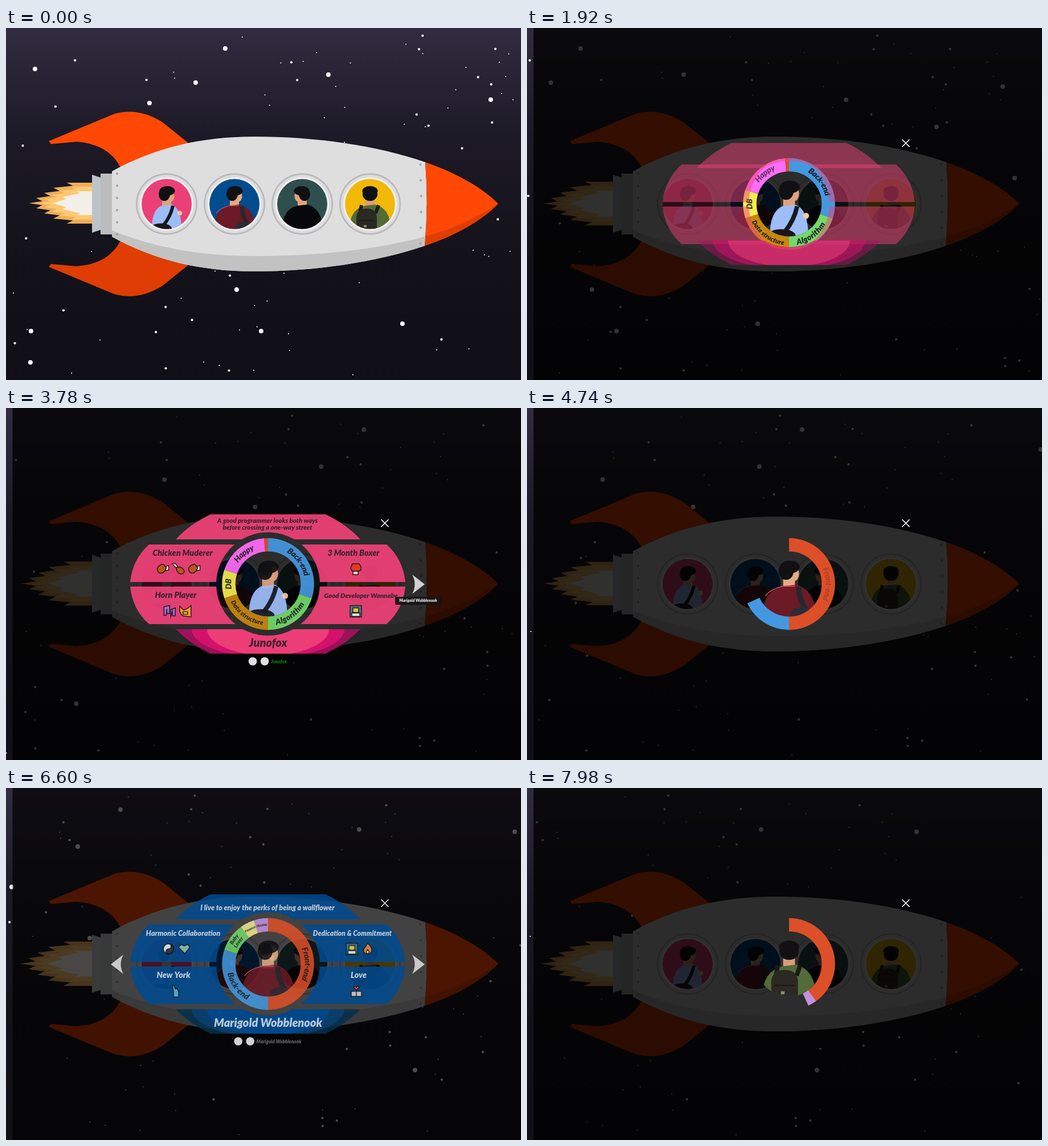
An HTML page with a canvas for the animation above (8 s loop, 904 by 619 pixels).

```html
<!DOCTYPE html>
<html lang="en">
<head>
<meta charset="utf-8">
<title>Rocket crew</title>
<style>
  html, body { margin: 0; width: 100%; height: 100%; overflow: hidden; background: #13121a; }
  canvas { display: block; }
</style>
</head>
<body>
<canvas id="stage" width="904" height="619"></canvas>
<script>
const ctx = document.getElementById('stage').getContext('2d');
const LOOP = 8000, TAU = Math.PI * 2, CX = 460, CY = 309.5;
const clamp = v => Math.max(0, Math.min(1, v));

function fill(color, path) {
  ctx.fillStyle = color;
  ctx.fill(typeof path === 'string' ? new Path2D(path) : path);
}
function line(color, width, path) {
  ctx.strokeStyle = color;
  ctx.lineWidth = width;
  ctx.stroke(new Path2D(path));
}
function oval(x, y, rx, ry, color) {
  ctx.beginPath();
  ctx.ellipse(x, y, rx, ry, 0, 0, TAU);
  ctx.fillStyle = color;
  ctx.fill();
}
const disc = (x, y, r, color) => oval(x, y, r, r, color);

function scoped(draw, alpha = 1) {
  if (alpha <= 0) return;
  ctx.save();
  ctx.globalAlpha *= alpha;
  draw();
  ctx.restore();
}
function mirrored(draw, width, height) {
  scoped(() => {
    ctx.translate(width, height);
    ctx.scale(width ? -1 : 1, height ? -1 : 1);
    draw();
  });
}
function setFont(size) {
  ctx.font = `italic 900 ${size}px Lato, sans-serif`;
}
function text(str, x, y, size, color) {
  setFont(size);
  ctx.textAlign = 'center';
  ctx.textBaseline = 'middle';
  ctx.fillStyle = color;
  ctx.fillText(str, x, y);
}

// Sky: the nearest stars have fixed places, the fine ones are scattered.
const nearStars = [[51, 72], [385, 36], [333, 96], [252, 132], [566, 82], [851, 126], [405, 460], [44, 533], [43, 588],
  [448, 533], [696, 520], [1126, 103], [1010, 174], [1147, 264], [1201, 38], [1620, 73], [1718, 496], [1893, 77]];

function scatter(count, width, seed) {
  const random = () => (seed = seed * 16807 % 2147483647) / 2147483647;
  return Array.from({ length: count }, () => [random() * width, random() * 619]);
}
const starLayers = [
  { speed: 30.3, r: 1, stars: scatter(75, 1150, 4127) },
  { speed: 60.6, r: 2.1, stars: scatter(52, 1390, 9281) },
  { speed: 151.5, r: 4, stars: nearStars }
];

const sky = ctx.createLinearGradient(0, 0, 0, 619);
[[0, '#312c40'], [.3, '#1d1a27'], [.65, '#13121a'], [1, '#100f17']].forEach(s => sky.addColorStop(...s));

function drawSky(t) {
  ctx.fillStyle = sky;
  ctx.fillRect(0, 0, 904, 619);
  for (const { speed, r, stars } of starLayers)
    for (const [x, y] of stars) disc(x - speed * t / 1000, y, r, '#fff');
}

// Crew seen from behind; facing is -1 left, 0 away, 1 right.
const crew = [
  { facing: 1, width: 26, skin: '#e2a27d', shirt: '#9dbdf8', gear() {
    disc(23, 16, 4, '#f3c9a8');
    line('#17171c', 6, 'M11 3Q7 22-6 38');
    oval(-10, 43, 19, 9, '#17171c');
  } },
  { facing: 1, width: 36, skin: '#e3ab84', shirt: '#6b1a26', gear() {
    line('#e8485c', 1.2, 'M-32 16Q-24 6-8 3H8');
    line('#26262e', 7, 'M13 4Q13 18 22 34');
    oval(17, 41, 15, 10, '#2c2c36');
  } },
  { facing: -1, width: 35, skin: '#e3a27e', shirt: '#08080a', gear() {} },
  { facing: 0, width: 36, skin: '#dd9c78', shirt: '#526b38', gear() {
    line('#1c1b18', 6, 'M-15 2L-18 16M15 2L10 16');
    fill('#2b2923', 'M-24 44V24Q-23 8-6 8Q11 8 12 24V44Z');
    line('#1c1b18', 2, 'M-20 29H8');
    fill('#8f8a76', 'M-11 37H-6V41H-11Z');
  } }
];

function drawCrew(index, x, scale) {
  const { facing, width, skin, shirt, gear } = crew[index];
  scoped(() => {
    ctx.translate(x, CY);
    ctx.scale(scale, scale);
    ctx.clip(new Path2D('M-44 0A44 44 0 0 1 44 0A44 44 0 0 1-44 0Z'));
    fill(skin, 'M-8-12H8V6H-8Z');
    if (facing) oval(facing * 7, -14, 6.5, 10, skin);
    oval(facing, -23, 13.5, 8.5, '#111114');
    oval(-facing * 4, -17, facing ? 10 : 13, 11.5, '#111114');
    fill(shirt, `M${-width} 44Q${-width} 10-9 3L9 1Q${width} 8 ${width} 44Z`);
    gear();
  });
}

const FIN = 'M75 199L190 151Q233 139 275 166L321 203 201 245Q180 204 124 200L79 204Z';
const BODY = new Path2D('M186 252C260 211 340 191 437 191C540 191 650 206 736 236Q742 309 735 383C650 412 540 428 437 428C340 428 260 408 186 367Z');

// A flame is a row of spikes that grow longer towards its middle line.
function flame(length, height, spikes, color) {
  const edge = [];
  for (let i = 0; i < spikes; i++) {
    const u = i / (spikes - 1), x = -length * (.4 + .6 * u ** .75), y = -height * (1 - u);
    edge.push([x, y]);
    if (u < 1) edge.push([x + length * .1, y + height * .15]);
  }
  ctx.beginPath();
  ctx.moveTo(0, -height);
  edge.forEach(([x, y]) => ctx.lineTo(x, y));
  edge.reverse().forEach(([x, y]) => ctx.lineTo(x, -y));
  ctx.lineTo(0, height);
  ctx.fillStyle = color;
  ctx.fill();
}

function drawFlame(t) {
  const pulse = (1 - Math.cos(t / 1440 * TAU)) / 2;
  scoped(() => {
    ctx.translate(151, 308 + pulse);
    ctx.scale(1 + .15 * pulse, 1 + .09 * pulse);
    flame(111, 36, 5, '#f0ae58');
    flame(94, 29, 5, '#fdc872');
    flame(69, 21, 3, '#f3efe9');
  });
}

function drawRocket(t) {
  drawFlame(t);
  fill('#ff4804', FIN);
  mirrored(() => fill('#df3d04', FIN), 0, 619);
  fill('#bcc4ca', 'M151 258L166 263V355L151 360Z');
  fill('#bcbcbc', 'M166 256H186V363H166Z');
  fill('#dedede', BODY);
  scoped(() => {
    ctx.clip(BODY);
    fill('#c1c2c1', 'M186 356C260 386 340 401 437 401C540 401 650 391 745 364V430H186Z');
  });
  fill('#ff4804', 'M736 236C785 253 832 277 864 309C832 342 785 366 735 383Q742 309 736 236Z');
  fill('#df3d04', 'M864 309Q805 348 737 366L735 383C785 366 832 342 864 309Z');
  for (let i = 0; i < 6; i++) {
    disc(195, 256 + i * 21.4, 2, '#a0a0a2');
    disc(729 - Math.abs(i - 2.5) * .7, 240 + i * 27.8, 2, '#a0a0a2');
  }
  ['#eb4077', '#004c8f', '#2f4f4f', '#f1b808'].forEach((color, i) => {
    const x = 282 + i * 119;
    disc(x, CY, 54, '#b7b7b9');
    disc(x, CY, 51.5, '#dcdcde');
    disc(x, CY, 47, '#f5f0f0');
    disc(x, CY, 44, color);
    drawCrew(i, x, 1);
  });
}

// Outlined pictograms about 22px wide, centred on the origin: colour and path pairs.
const icons = {
  leg: [['#fff', 'M4-4L10-6V2L4 3Z'], ['#b45a17', 'M-10-1Q-6-9 1-8L6-2Q2 9-6 7Q-10 5-10-1Z']],
  bone: [['#fff', 'M-11-9L-6-10 0-2-3 0Z'], ['#b45a17', 'M-4-3Q7-5 10 4Q9 11 1 8Q-4 5-4-3Z']],
  notes: [['#9b6ee0', 'M-10-8L0-10V4H-5V-4L-6 7H-10ZM2-3L10-6V8H5V0L2 9Z']],
  horn: [['#f0a02c', 'M-10-9L-3-2Q5-5 10-10V10L-4 8Q-11 4-10-9Z'], ['#ffd06a', 'M-4 1H4V5H-4Z']],
  glove: [['#e6391f', 'M-6-9H6L9-4V2L4 4H-6L-9-1Z'], ['#e8e4e0', 'M-5 4H4V10H-5Z']],
  coder: [['#3c7f86', 'M-10-10H10V10H-10Z'], ['#f4c542', 'M-5-6H5V2H-5Z'], ['#dfeeee', 'M-7 3H7V9H-7Z']],
  yin: [['#e8eef2', 'M-9 0A9 9 0 0 1 9 0A9 9 0 0 1-9 0Z'], ['#14202c', 'M0-9A9 9 0 0 1 0 9A4.5 4.5 0 0 1 0 0A4.5 4.5 0 0 0 0-9Z']],
  hands: [['#8fc6b6', 'M-10-3L-5-8 0-5 6-8 10-3 1 8Z']],
  fire: [['#f08a3c', 'M0-10Q9-2 7 5Q0 14-7 5Q-8 1-4-3Z'], ['#f8d47a', 'M0 1Q5 7 0 8Q-5 7 0 1Z']],
  statue: [['#55b8d8', 'M-6-10H-3L-1-4 2-5 5 1V10H-4V1Z']],
  couple: [['#e3cfc0', 'M-9 0H0V9H-9ZM0 0H9V9H0Z'], ['#e0506a', 'M0-2L-5-7Q-2-11 0-7Q2-11 5-7Z']]
};

function drawIcon(name, x, y) {
  scoped(() => {
    ctx.translate(x, y);
    for (const [color, path] of icons[name]) {
      fill(color, path);
      line('#1b1410', 1.5, path);
    }
  });
}

// Ring segments: end angle in degrees, colour, label, label size.
const ORANGE = '#dd4f28', BLUE = '#4498e0', GREEN = '#73d96a', PURPLE = '#c491dd';
const cards = [
  { open: 740, close: 3750, crew: 0, color: '#ef4178', shades: ['#a8105f', '#d9126d'], ink: '#30202a',
    name: 'Junofox', tagColor: '#128012', next: 'Marigold Wobblenook',
    segments: [[108, BLUE, 'Back-end', 14], [180, GREEN, 'Algorithm', 14], [252, '#c8870d', 'Data structure', 11],
      [288, '#f2ec50', 'DB', 14], [355, '#ff6cf8', 'Happy', 14], [360, ORANGE]],
    quote: ['A good programmer looks both ways', 'before crossing a one-way street'], quoteSize: 11.4,
    facts: [
      { title: 'Chicken Muderer', x: 310, size: 14.4, icons: ['leg', 'bone', 'leg'], iconX: 303 },
      { title: '3 Month Boxer', x: 610, size: 14.4, icons: ['glove'], iconX: 614 },
      { title: 'Horn Player', x: 298, size: 14.4, icons: ['notes', 'horn'], iconX: 301 },
      { title: 'Good Developer Wannabe', x: 623, size: 11.6, icons: ['coder'], iconX: 614 }] },
  { open: 4210, close: 6540, crew: 1, color: '#004b90', shades: ['#04304d', '#0a3f70'], ink: '#dcdfe4',
    name: 'Marigold Wobblenook', tagColor: '#777', previous: true,
    segments: [[180, ORANGE, 'Front-end', 14], [288, BLUE, 'Back-end', 14], [324, GREEN, 'Baby\nLover', 9],
      [342, '#ece98c', 'Finance', 6], [360, PURPLE, 'Hustler', 6]],
    quote: ['I live to enjoy the perks of being a wallflower'], quoteSize: 12.5,
    facts: [
      { title: 'Harmonic Collaboration', x: 311, size: 12.8, icons: ['yin', 'hands'], iconX: 299 },
      { title: 'Dedication & Commitment', x: 608, size: 12.2, icons: ['coder', 'fire'], iconX: 621 },
      { title: 'New York', x: 294, size: 14.4, icons: ['statue'], iconX: 298 },
      { title: 'Love', x: 619, size: 14.4, icons: ['couple'], iconX: 615 }] },
  { open: 7645, close: LOOP, crew: 3, segments: [[144, ORANGE], [360, PURPLE]] }
];

const SWEEP = 780;
function arcText(str, degrees, radius, size) {
  const flip = degrees > 90 && degrees < 270, dir = flip ? -1 : 1;
  setFont(size);
  let angle = degrees * TAU / 360 - dir * ctx.measureText(str).width / 2 / radius;
  for (const ch of str) {
    const half = dir * ctx.measureText(ch).width / 2 / radius;
    angle += half;
    scoped(() => {
      ctx.translate(CX, CY);
      ctx.rotate(angle);
      ctx.translate(0, -radius);
      if (flip) ctx.rotate(Math.PI);
      text(ch, 0, 0, size, '#1d1d1f');
    });
    angle += half;
  }
}

function drawRing(segments, elapsed) {
  const swept = clamp(elapsed / SWEEP) * 360;
  let start = 0;
  for (const [end, color, label = '', size] of segments) {
    const stop = Math.min(end, swept);
    if (stop > start) {
      ctx.beginPath();
      ctx.arc(CX, CY, 69, (start - 90) * TAU / 360, (stop - 90) * TAU / 360);
      ctx.lineWidth = 23.5;
      ctx.strokeStyle = color;
      ctx.stroke();
    }
    const rows = label.split('\n'), middle = (start + end) / 2;
    scoped(() => rows.forEach((row, i) => arcText(row, middle, 69 + ((rows.length - 1) / 2 - i) * 9, size)),
      clamp((elapsed - end / 360 * SWEEP) / 600));
    start = end;
  }
}

const HOLE = new Path2D('M0 0H904V619H0ZM369 309.5A91 91 0 0 1 551 309.5A91 91 0 0 1 369 309.5Z');
const TOP = 'M359 187H561Q597 204 622 231H298Q323 204 359 187Z';
const BOTTOM = new Path2D('M298 389H622Q597 415 561 432H359Q323 415 298 389Z');
const SIDE = 'M251 240H460V306H218Q222 266 251 240Z';

function panel(dx, dy, alpha, draw) {
  scoped(() => {
    ctx.translate(dx, dy);
    ctx.clip(HOLE, 'evenodd');
    draw();
  }, alpha);
}

function drawPanels(card, elapsed) {
  const rest = (1 - clamp((elapsed - 950) / 800)) ** 2, alpha = 1 - rest;
  const textAlpha = clamp((elapsed - 1330) / 600);
  const { quote, quoteSize, ink } = card;
  panel(0, 30 * rest, alpha, () => {
    fill(card.color, TOP);
    scoped(() => quote.forEach((row, i) =>
      text(row, CX - 1, 211 + (i - quote.length + 1) * 12.5, quoteSize, ink)), textAlpha);
  });
  card.facts.forEach((fact, i) => {
    const right = i % 2, low = i > 1, names = fact.icons;
    panel((right ? -40 : 40) * rest, 0, alpha, () => {
      mirrored(() => fill(card.color, SIDE), right && 919, low && 620);
      scoped(() => {
        text(fact.title, fact.x, low ? 330 : 256, fact.size, ink);
        names.forEach((name, k) =>
          drawIcon(name, fact.iconX + (k - (names.length - 1) / 2) * 27.5, low ? 357.5 : 283));
      }, textAlpha);
    });
  });
  panel(0, -30 * rest, alpha, () => {
    fill(card.shades[0], BOTTOM);
    ctx.clip(BOTTOM);
    oval(CX, 389, 134, 50, card.shades[1]);
    oval(CX, 389, 107, 46, card.color);
    scoped(() => text(card.name, CX, 414, 20, ink), textAlpha);
  });
  scoped(() => drawControls(card, elapsed), textAlpha);
}

function drawControls(card, elapsed) {
  const x = 479, arrow = () => fill('#dedede', 'M713 293L735 310 713 327Q722 310 713 293Z');
  text(card.name, x, 446, 8.3, card.tagColor);
  const left = x - ctx.measureText(card.name).width / 2;
  disc(left - 11, 445.5, 7.3, '#f2f2f2');
  disc(left - 32, 445.5, 7.3, '#f2f2f2');
  arrow();
  if (card.previous) mirrored(arrow, 919, 0);
  if (card.next) scoped(() => {
    ctx.beginPath();
    ctx.roundRect(683, 332, 81, 14, 2);
    ctx.fillStyle = '#151515';
    ctx.fill();
    text(card.next, 723.5, 339, 7, '#fff');
  }, clamp((elapsed - 1850) / 150));
}

function drawCard(card, t) {
  const elapsed = t - card.open;
  scoped(() => {
    drawCrew(card.crew, CX, 1.3);
    drawRing(card.segments, elapsed);
    if (card.facts) drawPanels(card, elapsed);
  }, clamp(elapsed / 200) * (1 - clamp((t - card.close) / 450)));
}

function drawOverlay(t) {
  const [first, second, third] = cards;
  const shade = clamp((t - first.open) / 250) * (1 - clamp((t - second.close) / 490)) + clamp((t - third.open) / 250);
  scoped(() => {
    ctx.fillStyle = 'rgba(0,0,0,.8)';
    ctx.fillRect(11.5, 0, 893, 619);
    line('#fff', 1.7, 'M658.5 196L671.5 209M671.5 196L658.5 209');
  }, shade);
}

const begin = performance.now();
function frame() {
  const t = (performance.now() - begin) % LOOP;
  drawSky(t);
  drawRocket(t);
  drawOverlay(t);
  cards.forEach(card => drawCard(card, t));
  requestAnimationFrame(frame);
}
frame();
</script>
</body>
</html>
```
